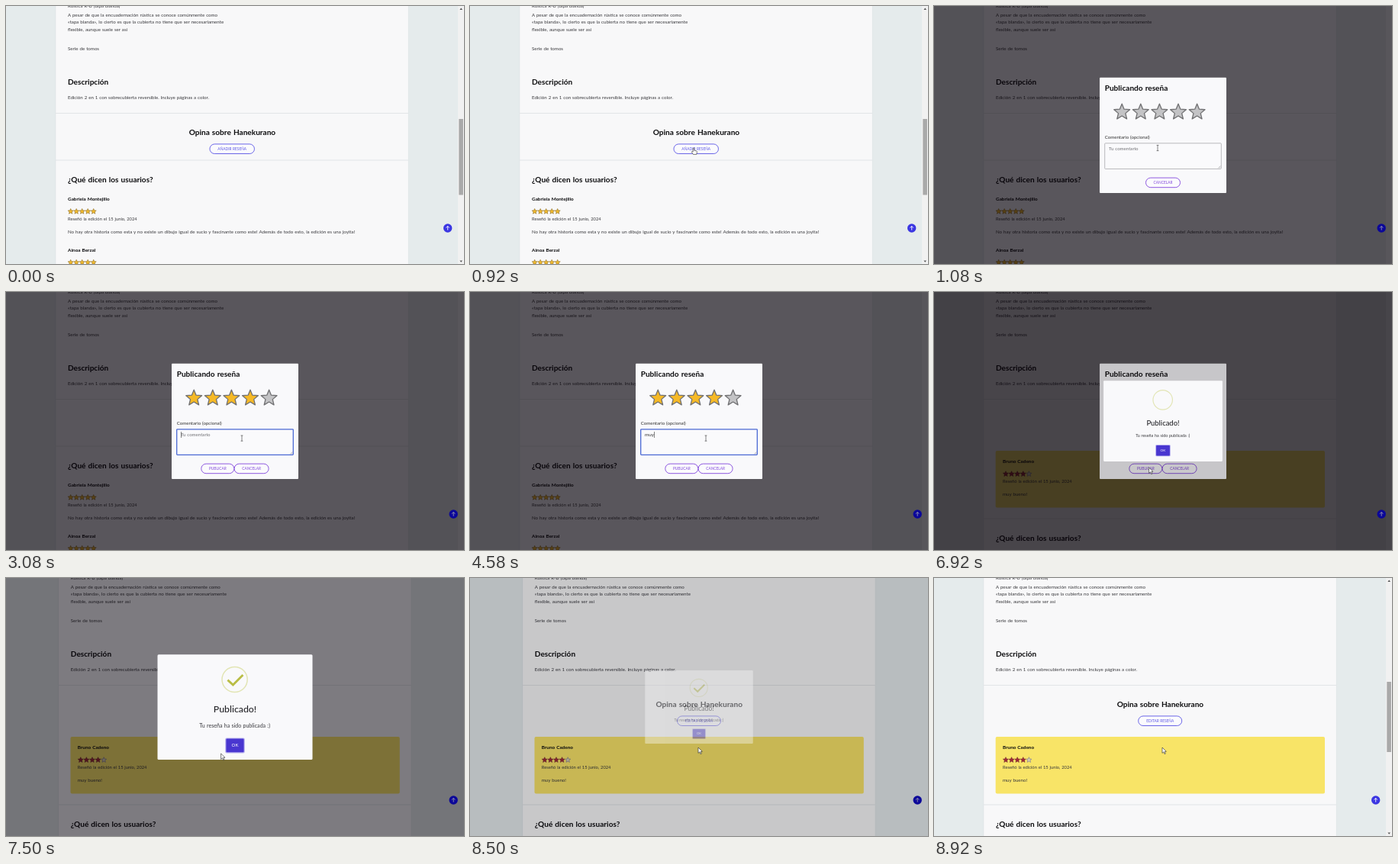
Recreate the animation shown at these times as an HTML page. Size 600 by 338 pixels, loop 9 s.

```html
<!DOCTYPE html>
<html lang="es">
<head>
<meta charset="utf-8">
<title>Publicar reseña</title>
<style>
  html, body { margin: 0; width: 100%; height: 100%; overflow: hidden; background: #e5ebec; }
  svg { display: block; width: 100vw; height: 100vh; }
  text { font-family: Lato, "Open Sans", sans-serif; font-size: 6.16px; word-spacing: .06em; fill: #38383c; white-space: pre; }
  .h { font-size: 10.1px; font-weight: 700; fill: #0c0c0e; }
  .name { font-size: 6.4px; font-weight: 700; fill: #0c0c0e; }
  .date { font-size: 5.8px; }
  .btn { font-size: 4.8px; text-anchor: middle; }
  .mid { text-anchor: middle; }
</style>
</head>
<body>
<svg id="stage" viewBox="0 0 600 338" xmlns="http://www.w3.org/2000/svg">
  <rect width="600" height="338" fill="#e5ebec"/>
  <rect id="gutter" x="592" width="8" height="338" fill="#f5f6f7"/>
  <g id="page"></g>
  <g id="bar">
    <rect x="592" width="8" height="338" fill="#f1f1f1"/>
    <rect id="thumb" x="593.3" width="5.6" fill="#a9a9a9"/>
    <path d="M594.4 5l1.8-2.4 1.8 2.4zM594.4 333.4l1.8 2.4 1.8-2.4z" fill="#555"/>
  </g>
  <rect id="shade" width="600" height="338" fill="#050008"/>
  <g id="modal"></g>
  <rect id="shade2" width="600" height="338" fill="#050008"/>
  <g id="up">
    <circle id="disc" cy="291" r="5.7"/>
    <path id="upArrow" d="M0 293.6v-5M-2.1 290.6L0 288.4l2.1 2.2" fill="none" stroke-width=".9"/>
  </g>
  <g id="alert"></g>
  <g id="cursor">
    <path id="arrow" d="M0 0V7.4L1.8 5.8 3.1 8.6 4.3 8.1 3.1 5.3H5.4Z" fill="#fff" stroke="#222" stroke-width=".6"/>
    <path id="beam" d="M-1.4-3.6H1.4M0-3.6V3.6M-1.4 3.6H1.4" fill="none" stroke="#333" stroke-width=".6"/>
    <path id="hand" d="M-.8.4Q0-.6.8.4V3.2L3.8 4Q4.6 4.3 4.4 5.4L3.8 8.4H-.6L-2.8 5.2Q-2.6 4-.8 5Z" fill="#fff" stroke="#222" stroke-width=".6"/>
  </g>
</svg>
<script>
const LOOP = 9000;
const OPEN = 990, RATE = 1950, FOCUS = 2800, SENT = 6895, CLOSE = 8410;
const $ = id => document.getElementById(id);

function add(parent, tag, attrs = {}, content) {
  const el = document.createElementNS('http://www.w3.org/2000/svg', tag);
  for (const k in attrs) el.setAttribute(k, attrs[k]);
  if (content) el.textContent = content;
  parent.appendChild(el);
  return el;
}
const label = (p, x, y, s, cls = '', style = '') => add(p, 'text', { x, y, class: cls, style }, s);
const box = (p, x, y, w, h, fill, more) => add(p, 'rect', { x, y, width: w, height: h, fill, ...more });
const show = (el, on) => { el.style.display = on ? '' : 'none'; };

function starPath(cx, cy, r, ratio = .45) {
  const pts = [];
  for (let i = 0; i < 10; i++) {
    const a = i * Math.PI / 5 - Math.PI / 2, d = i % 2 ? r * ratio : r;
    pts.push((cx + d * Math.cos(a)).toFixed(2) + ' ' + (cy + d * Math.sin(a)).toFixed(2));
  }
  return 'M' + pts.join('L') + 'Z';
}
function starRow(p, x, y, step, r, fill, stroke, width) {
  return [0, 1, 2, 3, 4].map(i => add(p, 'path', {
    d: starPath(x + i * step, y, r), fill, stroke, 'stroke-width': width, 'stroke-linejoin': 'round'
  }));
}
function button(p, cx, cy, w, text, color) {
  const g = add(p, 'g');
  box(g, cx - w / 2, cy - 6.3, w, 12.6, '#fbfbfd', { rx: 6.3, stroke: color, 'stroke-width': .9 });
  label(g, cx, cy + 1.7, text, 'btn', 'fill:' + color);
  return g;
}

// Page
const page = $('page');
box(page, 64.5, 0, 463, 338, '#dde3e5');
box(page, 65.3, 0, 461.6, 338, '#f8f8f9');
label(page, 81, 1.5, 'Rústica R-B (tapa blanda)');
label(page, 81, 13.6, 'A pesar de que la encuadernación rústica se conoce comúnmente como');
label(page, 81, 23.3, '«tapa blanda», lo cierto es que la cubierta no tiene que ser necesariamente');
label(page, 81, 33, 'flexible, aunque suele ser así');
label(page, 81, 58.3, 'Serie de tomos');
label(page, 81, 102.6, 'Descripción', 'h');
label(page, 81, 121.8, 'Edición 2 en 1 con sobrecubierta reversible. Incluye páginas a color.');
box(page, 65, 140, 462, 1, '#e2e5e7');
label(page, 296.4, 169.4, 'Opina sobre Hanekurano', 'h mid');
const addBtn = button(page, 296.2, 187.2, 58.5, 'AÑADIR RESEÑA', '#5b55e6');
const editBtn = button(page, 296.2, 187.2, 57, 'EDITAR RESEÑA', '#5b55e6');

const WHEN = 'Reseñó la edición el 15 junio, 2024';
const card = add(page, 'g');
box(card, 80.7, 208, 431.3, 74.4, '#f8e467', { rx: 2 });
label(card, 90, 224.4, 'Bruno Cadeno', 'name');
const lastStar = starRow(card, 94, 238.4, 7.6, 3.7, '#a32a36', '#6f2030', .6)[4];
lastStar.setAttribute('fill', '#d5cdb4');
lastStar.setAttribute('stroke', '#77748f');
label(card, 90, 250.3, WHEN, 'date');
label(card, 90, 267.2, 'muy bueno!');

const list = add(page, 'g');
box(list, 65, 201.5, 462, 1, '#e2e5e7');
label(list, 81, 230.6, '¿Qué dicen los usuarios?', 'h');
label(list, 81, 255, 'Gabriela Montejillo', 'name');
starRow(list, 84.7, 269.2, 7.5, 3.7, '#f3bb2c', '#8a6a22', .6);
label(list, 81, 280.6, WHEN, 'date');
label(list, 81, 297.6, 'No hay otra historia como esta y no existe un dibujo igual de sucio y fascinante como este! Además de todo esto, la edición es una joyita!');
label(list, 81, 321.5, 'Ainoa Berzal', 'name');
starRow(list, 84.7, 336, 7.5, 3.7, '#f3bb2c', '#8a6a22', .6);

// Review form
const modal = $('modal');
box(modal, 217, 93.7, 166, 151.3, '#f9f9fb', { rx: 1 });
label(modal, 223.7, 110.6, 'Publicando reseña', 'h');
const stars = starRow(modal, 246.2, 139.1, 24.6, 10.9, '#c3c3c5', '#707072', 1.3);
label(modal, 223.7, 173.6, 'Comentario (opcional)', '', 'font-size:6.1px;fill:#333');
const area = box(modal, 223.7, 179.8, 152.6, 33.6, '#fafafc', { rx: .8 });
add(modal, 'path', { d: 'M372.4 212.4l3-3M374.2 212.4l1.2-1.2', stroke: '#777', 'stroke-width': .5 });
const hint = label(modal, 229, 189.2, 'Tu comentario', '', 'font-size:6.1px;fill:#707074');
const typed = label(modal, 229, 189.2, '', '', 'font-size:6.3px;fill:#333');
const caret = box(modal, 229, 183, .6, 8, '#333');
const cancel = button(modal, 300, 231.4, 45, 'CANCELAR', '#8247dc');
const publish = button(modal, 277.3, 231.4, 43, 'PUBLICAR', '#8247dc');

// Confirmation
const alertBox = $('alert');
box(alertBox, 198.5, 100.2, 203, 137.8, '#f9f9fb', { rx: 1.5 });
add(alertBox, 'circle', { cx: 299.6, cy: 133, r: 16.6, fill: 'none', stroke: '#e2e5b4', 'stroke-width': 1.5 });
const tick = add(alertBox, 'path', {
  d: 'M290.4 133.6L297.4 140L310.4 127', fill: 'none', stroke: '#b9bd45',
  'stroke-width': 2.8, pathLength: 100, 'stroke-dasharray': '100 200'
});
label(alertBox, 300, 176.4, 'Publicado!', 'mid', 'font-size:12.3px;font-weight:500;fill:#242428');
label(alertBox, 299.7, 196.1, 'Tu reseña ha sido publicada :)', 'mid', 'font-size:7.1px');
box(alertBox, 287.2, 209.4, 25.6, 20, '#b7b0ee', { rx: 2 });
box(alertBox, 288.4, 210.6, 23.2, 17.6, '#4936d0', { rx: 1.2 });
label(alertBox, 300, 221.4, 'OK', 'mid', 'font-size:6px;fill:#fff');

// Motion tables: [time, value...]
const path = [
  [300, 352, 300], [750, 293, 186], [1250, 293, 186], [1700, 318, 142], [2150, 320, 142],
  [2650, 309, 191.6], [6000, 309, 191.6], [6550, 281.6, 230], [7830, 281.6, 230], [8250, 299, 222]
];
const pop = [[0, .7], [135, 1.05], [240, .95], [300, 1]];
const keys = [4080, 4250, 4420, 4660, 4750, 4830, 4920, 5000, 5080, 5300];

const ease = k => k * k * (3 - 2 * k);
const ramp = (t, a, b) => Math.min(1, Math.max(0, (t - a) / (b - a)));
function track(rows, t, curve = k => k) {
  let i = 0;
  while (i < rows.length - 2 && t >= rows[i + 1][0]) i++;
  const [a, b] = [rows[i], rows[i + 1]];
  const k = curve(ramp(t, a[0], b[0]));
  return a.slice(1).map((v, j) => v + (b[j + 1] - v) * k);
}
const within = (x, y, l, t, r, b) => x > l && x < r && y > t && y < b;

function shapeAt(t, x, y) {
  if (t < OPEN) return within(x, y, 267, 181, 325, 194) ? 'hand' : 'arrow';
  if (t < SENT) {
    if (within(x, y, 224, 180, 376, 213)) return 'beam';
    return within(x, y, 235, 127, 356, 151) || within(x, y, 256, 225, 344, 238) ? 'hand' : 'arrow';
  }
  return t < CLOSE && within(x, y, 288, 210, 312, 229) ? 'hand' : 'arrow';
}

function render(t) {
  const [x, y] = track(path, t, ease);
  const sent = t >= SENT, barOn = t < OPEN || t >= CLOSE + 130;
  const formGone = t >= SENT + 190;

  // Page layout
  show(addBtn, !sent);
  show(editBtn, sent);
  show(card, sent);
  list.setAttribute('transform', `translate(0 ${sent ? 95 : 0})`);
  page.setAttribute('transform', `translate(${formGone && !barOn ? 3.8 : 0} 0)`);
  show($('bar'), barOn);
  show($('gutter'), !barOn && !formGone);
  $('thumb').setAttribute('y', sent ? 136 : 148);
  $('thumb').setAttribute('height', sent ? 92 : 99.5);
  $('up').setAttribute('transform', `translate(${barOn ? 578.7 : 586.2} 0)`);
  $('disc').setAttribute('fill', barOn ? '#3b36e2' : '#0b0799');
  $('upArrow').setAttribute('stroke', barOn ? '#fff' : '#9a9ab0');

  // Form
  const form = ramp(t, OPEN, OPEN + 80) * (1 - ramp(t, SENT + 50, SENT + 190));
  $('shade').setAttribute('opacity', .65 * form);
  modal.setAttribute('opacity', form);
  show(modal, form > 0);
  const hover = t > OPEN && within(x, y, 234, 127, 357, 151);
  const score = t >= RATE ? 4 : hover ? Math.floor((x - 234) / 24.6) + 1 : 0;
  stars.forEach((s, i) => s.setAttribute('fill', i < score ? '#f6b926' : '#c3c3c5'));
  show(publish, t >= RATE);
  cancel.setAttribute('transform', `translate(${t >= RATE ? 21.6 : 0} 0)`);
  const focus = t >= FOCUS;
  area.setAttribute('stroke', focus ? '#4a68d4' : '#a9a9ac');
  area.setAttribute('stroke-width', focus ? 1.3 : .8);

  // Typing
  const n = keys.filter(k => k <= t).length;
  typed.textContent = 'muy bueno!'.slice(0, n);
  show(hint, !n);
  const since = t - (n ? keys[n - 1] : FOCUS);
  show(caret, focus && since % 1060 < 530);
  caret.setAttribute('x', 229.1 + (n ? typed.getComputedTextLength() : 0));

  // Confirmation
  const out = ramp(t, CLOSE, CLOSE + 150);
  const scale = out ? 1 - .5 * out : track(pop, t - SENT)[0];
  show(alertBox, sent && out < 1);
  alertBox.setAttribute('opacity', 1 - out);
  alertBox.setAttribute('transform', `translate(300 169) scale(${scale}) translate(-300 -169)`);
  $('shade2').setAttribute('opacity', .5 * ramp(t, SENT - 15, SENT + 85) * (1 - out));
  const drawn = ramp(t, SENT + 280, SENT + 580);
  tick.setAttribute('stroke-dashoffset', 100 * (1 - drawn));
  show(tick, drawn > 0);

  // Pointer
  show($('cursor'), t >= path[0][0]);
  $('cursor').setAttribute('transform', `translate(${x} ${y})`);
  const shape = shapeAt(t, x, y);
  for (const id of ['arrow', 'beam', 'hand']) show($(id), id === shape);
}

const start = performance.now();
function tickFrame() {
  render((performance.now() - start) % LOOP);
  requestAnimationFrame(tickFrame);
}
tickFrame();
</script>
</body>
</html>
```
